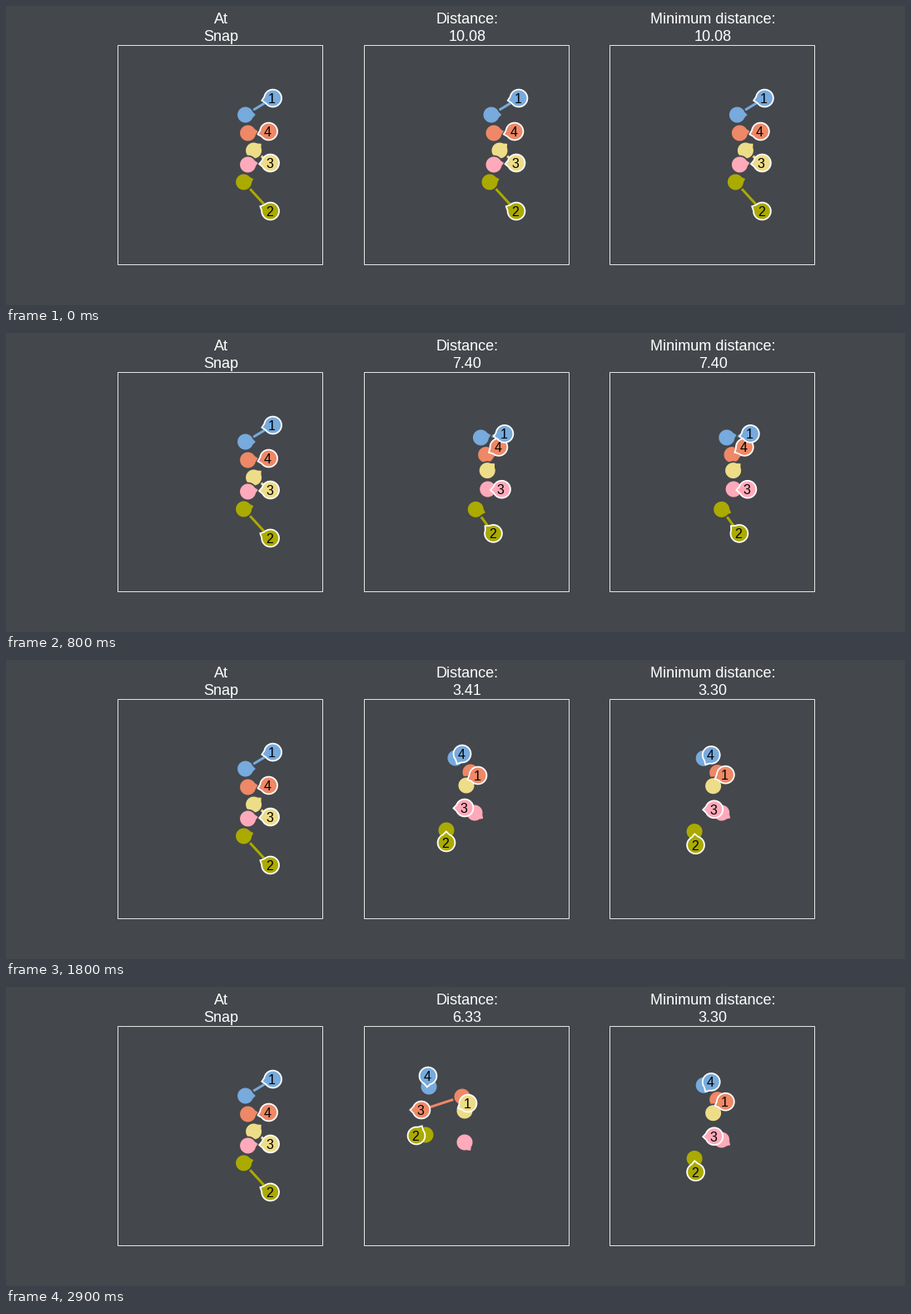
Recreate the animation shown at these times as a matplotlib script. Size 1080 by 360 pixels, loop 3.4 s.

```python
from itertools import permutations

import matplotlib.pyplot as plt
import numpy as np
from matplotlib.animation import FuncAnimation
from matplotlib.patches import Polygon, Rectangle

W, H, DPI = 1080, 360, 100
PT = 72 / DPI  # points per pixel
BACKGROUND = "#44474b"
FONT = "Liberation Sans"
RADIUS, EDGE = 10.4, 1.8
PANEL_STEP = 295.4
FRAMES, CLOSEST, LAST = 34, 17, 29

# Each player runs from rest through a place at the snap, at mid play and at
# the end, and turns from one facing (degrees) to another.
WAYPOINTS = [0, 18, LAST]
BLOCKERS = {
    "#77aadd": ([(583, 131), (540, 118), (508, 120)], (0, 80)),
    "#ee8866": ([(586, 153), (558, 135), (548, 132)], (10, -45)),
    "#eedd88": ([(593, 174), (553, 151), (551, 149)], (42, 50)),
    "#ffaabb": ([(586, 191), (563, 184), (551, 187)], (10, -55)),
    "#aaaa00": ([(581, 212), (529, 205), (504, 178)], (18, -180)),
}
RUSHERS = {
    "4": ([(611, 151), (548, 113), (507, 107)], (195, 265)),
    "3": ([(613, 189), (551, 178), (499, 148)], (185, 180)),
    "2": ([(613, 247), (529, 220), (493, 179)], (155, 60)),
    "1": ([(616, 111), (567, 139), (555, 140)], (192, 205)),
}
# Readings of the distance counter as (frame, value).
READINGS = [(0, 10.08), (4, 9.23), (8, 7.40), (14, 4.28),
            (CLOSEST, 3.30), (18, 3.41), (22, 4.25), (LAST, 6.33)]


def spline(t, keys, values, from_rest=False):
    """Smooth Hermite curve through unevenly spaced keys."""
    keys, values = np.asarray(keys, float), np.asarray(values, float)
    slopes = np.gradient(values, keys, axis=0)
    if from_rest:
        slopes[0] = 0
    i = int(np.clip(np.searchsorted(keys, t, side="right") - 1, 0, len(keys) - 2))
    h = keys[i + 1] - keys[i]
    u = (t - keys[i]) / h
    return (values[i] * (1 + 2 * u) * (1 - u) ** 2
            + slopes[i] * h * u * (1 - u) ** 2
            + values[i + 1] * u * u * (3 - 2 * u)
            + slopes[i + 1] * h * u * u * (u - 1))


def distance_at(t):
    return spline(t, *zip(*READINGS))


def poses(players, t, shift):
    """Rows of x, y, facing, one for each player."""
    u = t / LAST
    turn = u * u * (3 - 2 * u)
    rows = []
    for places, (start, end) in players.values():
        x, y = spline(t, WAYPOINTS, places, from_rest=True)
        rows.append((x + shift, y, start + (end - start) * turn))
    return np.array(rows)


def teardrop(x, y, facing):
    arc = np.radians(facing + np.linspace(22, 338, 60))
    angles = np.append(arc, np.radians(facing))
    radii = np.append(np.full(60, RADIUS), RADIUS * 1.3)
    return np.column_stack([x + radii * np.cos(angles), y - radii * np.sin(angles)])


def best_match(rushers, blockers):
    """Blocker index for each rusher with the least total distance."""
    gaps = np.hypot(rushers[:, None, 0] - blockers[None, :, 0],
                    rushers[:, None, 1] - blockers[None, :, 1])
    rows = np.arange(len(rushers))
    return min(permutations(range(len(blockers)), len(rushers)),
               key=lambda order: gaps[rows, list(order)].sum())


class Panel:
    def __init__(self, ax, column, heading, value=""):
        self.shift = (column - 1) * PANEL_STEP
        left = round(430.6 + self.shift) - 0.5 + (column == 1) * 0
        ax.add_patch(Rectangle((left, 47.5), 246, 264, fill=False, snap=False,
                               edgecolor="#e6e6e6", linewidth=PT))
        style = dict(ha="center", va="baseline", color="white",
                     family=FONT, fontsize=18 * PT)
        center = 553.7 + self.shift
        ax.text(center, 21, heading, **style)
        self.value = ax.text(center, 41.7, value, **style)
        self.links = [ax.plot([], [], lw=3 * PT, zorder=3)[0] for _ in RUSHERS]
        self.blockers = [self.marker(ax, color, BACKGROUND, 4 + i / 10)
                         for i, color in enumerate(BLOCKERS)]
        self.rushers = [self.marker(ax, "white", "white", 5 + i / 10)
                        for i in range(len(RUSHERS))]
        self.labels = [ax.text(0, 0, name, ha="center", va="baseline", family=FONT,
                               fontsize=16 * PT, color="black", zorder=6)
                       for name in RUSHERS]

    @staticmethod
    def marker(ax, fill, edge, zorder):
        return ax.add_patch(Polygon(teardrop(0, 0, 0), facecolor=fill, edgecolor=edge,
                                    linewidth=EDGE * PT, joinstyle="miter",
                                    zorder=zorder))

    def show(self, t):
        colors = list(BLOCKERS)
        blockers = poses(BLOCKERS, t, self.shift)
        rushers = poses(RUSHERS, t, self.shift)
        for patch, place in zip(self.blockers, blockers):
            patch.set_xy(teardrop(*place))
        match = best_match(rushers, blockers)
        for patch, label, link, place, j in zip(self.rushers, self.labels, self.links,
                                                rushers, match):
            x, y, _ = place
            patch.set_xy(teardrop(*place))
            patch.set_facecolor(colors[j])
            label.set_position((x - 1.2, y + 6))
            link.set_data([x, blockers[j, 0]], [y, blockers[j, 1]])
            link.set_color(colors[j])


fig = plt.figure(figsize=(W / DPI, H / DPI), dpi=DPI, facecolor=BACKGROUND)
ax = fig.add_axes([0, 0, 1, 1])
ax.set_xlim(0, W)
ax.set_ylim(H, 0)
ax.axis("off")

snap = Panel(ax, 0, "At", "Snap")
live = Panel(ax, 1, "Distance:")
nearest = Panel(ax, 2, "Minimum distance:")
snap.show(0)


def update(frame):
    t = min(frame, LAST)
    for panel, moment in ((live, t), (nearest, min(t, CLOSEST))):
        panel.show(moment)
        panel.value.set_text(f"{distance_at(moment):.2f}")
    return []


animation = FuncAnimation(fig, update, frames=FRAMES, interval=100,
                          init_func=lambda: update(0), repeat=True, repeat_delay=0)
plt.show()
```
